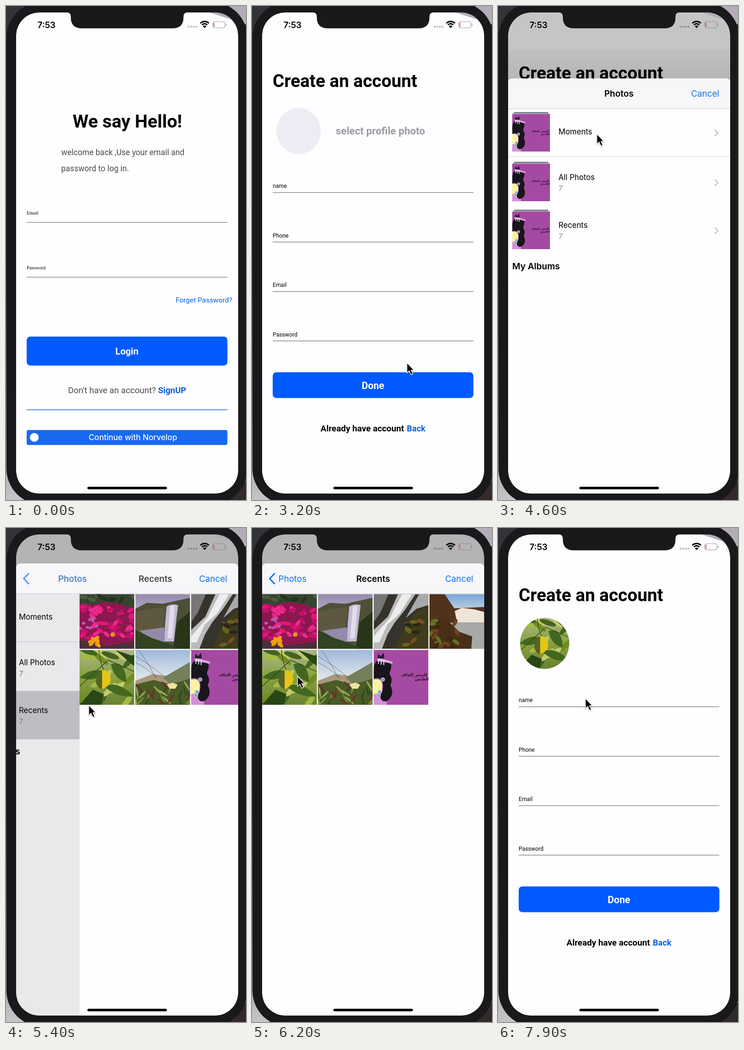
An HTML page that plays this animation: 522 by 1073 pixels, repeating every 8000 ms.

```html
<!DOCTYPE html>
<html lang="en">
<head>
<meta charset="utf-8">
<title>Sign-up flow</title>
<style>
html, body { margin: 0; width: 100%; height: 100%; overflow: hidden; background: #19181b; }
svg { display: block; width: 522px; height: 1073px; }
.r { font-family: Roboto, "Open Sans", sans-serif; }
.i { font-family: Inter, "Liberation Sans", sans-serif; }
.s { font-family: "Liberation Serif", serif; }
.b { font-weight: 700; }
.sb { font-weight: 600; }
.m { font-weight: 500; }
.mid { text-anchor: middle; }
.end { text-anchor: end; }
</style>
</head>
<body>
<svg id="stage" viewBox="0 0 522 1073" xmlns="http://www.w3.org/2000/svg"></svg>
<script>
const LOOP = 8000, SCREEN_W = 483, SHEET_TRAVEL = 990;
const BLUE = '#005aff', LINK = '#0a60e0', IOS = '#0a72ee';

const text = (x, y, size, cls, str, fill = '#000', extra = '') =>
  `<text x="${x}" y="${y}" font-size="${size}" class="${cls}" fill="${fill}" ${extra}>${str}</text>`;
const rect = (x, y, w, h, fill, extra = '') =>
  `<rect x="${x}" y="${y}" width="${w}" height="${h}" fill="${fill}" ${extra}/>`;
const path = (d, fill, extra = '') => `<path d="${d}" fill="${fill}" ${extra}/>`;
const stroke = (d, color, w) => path(d, 'none', `stroke="${color}" stroke-width="${w}" stroke-linecap="round" stroke-linejoin="round"`);
const rule = (y, color = '#67666b', h = 1.1) => rect(45, y - h / 2, 436.5, h, color);
const button = (y, h, r, fill) => rect(45, y, 436.5, h, fill, `rx="${r}"`);
const gradient = (id, ...stops) => `<linearGradient id="${id}" x2="0" y2="1">` +
  stops.map((c, i) => `<stop offset="${i / (stops.length - 1)}" stop-color="${c}"/>`).join('') + '</linearGradient>';

function randomFrom(seed) {
  return () => (seed = (seed * 16807) % 2147483647) / 2147483647;
}
function blobs(seed, n, [x, y, w, h], [rx, ry], colors) {
  const rnd = randomFrom(seed);
  return Array.from({ length: n }, (_, i) => {
    const cx = (x + rnd() * w).toFixed(1), cy = (y + rnd() * h).toFixed(1);
    return `<ellipse cx="${cx}" cy="${cy}" rx="${rx}" ry="${ry}" fill="${colors[i % colors.length]}"
      transform="rotate(${(rnd() * 120 - 60).toFixed(0)} ${cx} ${cy})"/>`;
  }).join('');
}

// Pictures are drawn on a 119 unit square.
const pictures = {
  flowers: rect(0, 0, 119, 119, '#8d174f') +
    path('M0 0H119V34L92 22L55 17L24 24L0 20Z', '#34452f') +
    blobs(71, 10, [0, 0, 119, 16], [9, 4], ['#4a5c42', '#263423']) +
    blobs(913, 54, [4, 26, 112, 78], [8, 4], ['#e3167b', '#c51069', '#ed2a8a']) +
    blobs(37, 8, [2, 50, 36, 28], [4, 3], ['#b35bb4']) +
    path('M0 119V100L26 104L60 112L119 103V119Z', '#4b3039') +
    blobs(19, 7, [25, 94, 17, 18], [7, 4], ['#f0a00d']) +
    '<circle cx="72" cy="88" r="5" fill="#e8941c"/>',
  gorge: rect(0, 0, 119, 119, 'url(#lilac)') +
    path('M0 32L25 19L60 21L119 8V119H0Z', '#4d5037') +
    path('M0 38L34 32L65 28L60 72L0 82Z', '#5f5841') +
    path('M68 27Q80 20 93 24L88 65L84 103H63L65 62Z', '#c4bbd6') +
    path('M76 26L86 25L80 96H70Z', '#e2dceb') +
    path('M8 80L64 72V106L40 98Z', '#928aa8') +
    path('M119 38L91 61L82 119H119Z', '#29351b') +
    path('M0 78L28 93L68 106L95 119H0Z', '#304421'),
  cascade: rect(0, 0, 119, 119, '#35332b') +
    path('M0 0H32L15 40L0 61Z', '#777575') +
    path('M53 0H91L69 33L45 63L30 88L18 119H0V78L31 49Z', '#b9bab9') +
    path('M62 0H83L56 43L30 66L12 105H0V92L35 52Z', '#ededed') +
    path('M99 0H119V24L93 32L70 52Z', '#a8aaaa') +
    path('M119 25L91 40L68 70L47 119H119Z', '#403b1c') +
    blobs(121, 12, [70, 55, 44, 60], [9, 4], ['#69621e', '#292619', '#755023']),
  lake: rect(0, 0, 119, 119, 'url(#morning)') +
    path('M0 0H33L54 31L119 28V71H0Z', '#51331d') +
    path('M55 37L70 30L97 33L119 39V62H60Z', '#efe4d8') +
    path('M43 62H119V119H30Z', '#a8a9a7') +
    path('M0 62L40 58L65 82L93 92L91 119H0Z', '#473016') +
    blobs(57, 17, [2, 58, 65, 57], [9, 4], ['#647022', '#6e421d', '#3b2916']),
  leaf: rect(0, 0, 119, 119, 'url(#foliage)') +
    blobs(433, 20, [0, 0, 119, 119], [20, 6], ['#718c23', '#a5b947', '#43641d', '#c3ca6a']) +
    path('M0 60Q26 37 54 47Q35 72 0 60ZM68 31Q99 20 102 69Q76 65 68 31ZM54 79Q83 65 119 101Q80 104 54 79Z', '#426820') +
    path('M0 119L29 86L53 96L47 119ZM78 0L119 14V35Z', '#294617') +
    stroke('M42 0Q44 28 54 46M0 79L62 22L119 47', '#35491c', 1.5) +
    path('M49 43Q66 43 68 63Q67 78 49 85Q44 66 49 43Z', '#e5c615') +
    path('M49 43Q38 52 35 68Q37 81 49 85Z', '#586322'),
  dune: rect(0, 0, 119, 119, 'url(#coast)') +
    path('M0 67L38 52L75 57L119 42V119H0Z', '#a8987f') +
    path('M60 60L119 26V76L77 75Z', '#74805a') +
    path('M0 75L40 65L77 75L119 62V119H0Z', '#4a5b26') +
    blobs(83, 28, [0, 73, 119, 44], [2, 12], ['#768d34', '#6b3028', '#324a1f', '#95a757']) +
    stroke('M0 13Q31 31 62 57M0 27Q24 38 48 61M7 0Q29 28 44 61', '#565a4e', .8) +
    path('M68 75L81 71L92 75L87 84L75 84Z', '#eee5a0'),
  poster: rect(0, 0, 119, 119, '#a54aa2') +
    path('M0 64Q17 60 19 76L18 91L0 98Z', '#faf3a3') +
    path('M0 96L15 92L28 105V119H0Z', '#d590d8') +
    path('M0 40Q3 18 18 23Q41 21 38 39L34 51Q43 65 36 76Q47 97 30 110Q17 116 13 99Q22 91 20 74Q18 57 0 62Z', '#18151c') +
    path('M8 18L10 8L15 14L22 6L23 18Z', '#211c29') +
    path('M9 18L30 22L42 26L40 30L27 27L7 24Z', '#d9a8df') +
    stroke('M12 19L10 29M17 20L16 31M22 21L22 32', '#eee5f2', 2) +
    [[20, 64], [13, 91], [11, 99]].map(([x, y]) =>
      `<circle cx="${x}" cy="${y}" r="4" fill="#8aa0b7" stroke="#d6e0e8"/>`).join('') +
    `<g font-family="'DejaVu Sans', sans-serif" font-weight="700" font-size="9" fill="#301530" text-anchor="middle">
      <text x="88" y="57">للشعر الجاف</text><text x="105" y="66">العايش</text></g>`
};
const picture = (name, x, y, size) =>
  `<svg x="${x}" y="${y}" width="${size}" height="${size}" viewBox="0 0 119 119">${pictures[name]}</svg>`;

const login = rect(22, 14, SCREEN_W, 1045, '#fefdff') +
  text(264, 264, 39.3, 'r b mid', 'We say Hello!') +
  text(120, 324, 17.5, 'r', 'welcome back ,Use your email and', '#4b4b50') +
  text(120, 359, 17.5, 'r', 'password to log in.', '#4b4b50') +
  text(45, 452.5, 10.7, 's', 'Email') + rule(470) +
  text(45, 571.5, 10.7, 's', 'Password') + rule(589) +
  text(492, 644, 15.4, 'r end', 'Forget Password?', LINK) +
  button(718, 63, 8, BLUE) + text(263, 757, 20.2, 'r b mid', 'Login', '#fff') +
  text(135, 841, 18.7, 'r', "Don't have an account?", '#4b4b50') +
  text(392, 841, 18.5, 'r b end', 'SignUP', LINK) +
  rule(877, '#235fc5', 1.4) +
  button(921, 32.5, 4, '#1769f0') + '<circle cx="61.5" cy="937" r="9.5" fill="#fff"/>' +
  text(276, 943, 17.1, 'i m mid', 'Continue with Norvelop', '#fff');

const account = rect(22, 14, SCREEN_W, 1045, '#fefdff') + '<g id="form">' +
  text(45, 159, 38.5, 'r b', 'Create an account') +
  '<g id="emptyPhoto"><ellipse cx="101.3" cy="254.5" rx="48" ry="49.7" fill="#ecedf4"/>' +
  text(182, 262, 22.4, 'r b', 'select profile photo', '#9b9ba1', 'id="selectPhoto"') + '</g>' +
  `<g id="avatar" clip-path="url(#avatarClip)">${picture('leaf', 46, 195, 111)}</g>` +
  ['name', 'Phone', 'Email', 'Password'].map((label, i) => {
    const y = 388.3 + i * 107.4;
    return text(45, y - 10, 12.2, 'r', label) + rule(y);
  }).join('') +
  button(778.5, 56, 8, BLUE) + text(263, 815, 21.2, 'r b mid', 'Done', '#fff') +
  text(149, 907, 18.8, 'r b', 'Already have account') +
  text(377, 907, 18, 'r b end', 'Back', LINK) + '</g>';

// Sheet parts use y = 0 at the top edge of the sheet.
const albumRow = (y, label, count) =>
  rect(35, y - 3.5, 74, 1.5, '#343841') + rect(33, y - 1.5, 78, 1.5, '#8291a0') +
  picture('poster', 31, y, 82) +
  text(131.5, y + (count ? 36 : 45), 16.7, 'i', label) +
  (count ? text(131.5, y + 60, 16.5, 'i', count, '#8a8a8f') : '') +
  stroke(`M472 ${y + 35}l6 6.5l-6 6.5`, '#b9b9be', 2);

const albums = rect(22, 0, SCREEN_W, 1000, '#fefdff') +
  rect(22, 277, SCREEN_W, 105, '#cfced4', 'id="rowPress"') +
  albumRow(77, 'Moments') + rect(22, 169.5, SCREEN_W, 1, '#d5d4d9') +
  albumRow(185, 'All Photos', '7') + albumRow(289, 'Recents', '7') +
  text(31, 415, 19, 'i sb', 'My Albums');

const grid = rect(22, 0, SCREEN_W, 1000, '#fefdff') +
  ['flowers', 'gorge', 'cascade', 'lake', 'leaf', 'dune', 'poster'].map((name, i) =>
    picture(name, 22 + (i % 4) * 121.3, i < 4 ? 66.5 : 188, 119)).join('');

const sheet = '<g clip-path="url(#sheetClip)">' +
  `<g id="albums">${albums}</g>` + rect(22, 0, SCREEN_W, 1000, '#000', 'id="albumShade"') +
  `<g id="grid">${grid}</g>` +
  rect(22, 0, SCREEN_W, 66, '#f7f6f9') + rect(22, 65.3, SCREEN_W, 1, '#c9c8cd') +
  `<g id="backArrow">${stroke('M49 22L38.5 33L49 44', IOS, 3)}</g>` +
  text(0, 40, 18.9, 'i sb mid', 'Photos', '#000', 'id="oldTitle"') +
  text(0, 40, 18.6, 'i mid', 'Photos', IOS, 'id="backLabel"') +
  text(0, 40, 18.8, 'i sb mid', 'Recents', '#000', 'id="newTitle"') +
  text(481, 40, 18.6, 'i end', 'Cancel', IOS) + '</g>';

const statusBar = text(88, 47.5, 18.6, 'i sb mid', '7:53') +
  [397, 402.7, 408.4, 414].map(x => `<circle cx="${x}" cy="45" r="2.2" fill="#000" opacity=".24"/>`).join('') +
  [[9.5, 37.5], [6, 41]].map(([w, y]) =>
    path(`M${432 - w} ${y}Q432 ${y - w * .85} ${432 + w} ${y}`, 'none', 'stroke="#000" stroke-width="2.8"')).join('') +
  path('M432 48L428 43.8Q432 41 436 43.8Z', '#000') +
  rect(449.5, 34, 27, 13.5, 'none', 'rx="4" stroke="#77757b" stroke-opacity=".7" stroke-width="1.2"') +
  rect(451.3, 36, 1.8, 9.5, '#d8503c', 'rx=".8"') + path('M478.3 38.5Q481 40.8 478.3 43Z', '#77757b');

const bezel = path('M0 0H522V1073H0ZM22 64V1009A50 50 0 0 0 72 1059H455A50 50 0 0 0 505 1009V64A50 50 0 0 0 455 14H72A50 50 0 0 0 22 64Z',
    'url(#desk)', 'fill-rule="evenodd"') +
  path('M400 0H522V40Z', '#b4adb8') + path('M480 1073H522V1030Z', '#332a2c') +
  path('M79-9H447A78 78 0 0 1 525 69V1005A78 78 0 0 1 447 1083H79A78 78 0 0 1 1 1005V69A78 78 0 0 1 79-9Z' +
    'M22 64V1009A50 50 0 0 0 72 1059H455A50 50 0 0 0 505 1009V64A50 50 0 0 0 455 14H72A50 50 0 0 0 22 64Z',
    '#19181b', 'fill-rule="evenodd"') +
  path('M132 13V14Q141 14 141 23V25Q141 48.5 165 48.5H362Q386 48.5 386 25V23Q386 14 395 14V13Z', '#19181b');

document.getElementById('stage').innerHTML = `<defs>
  ${gradient('lilac', '#9389ad', '#c8bfd4', '#81778f')}
  ${gradient('morning', '#78a5d8', '#f5eee7', '#a8a29b')}
  ${gradient('foliage', '#aab58a', '#88a23d', '#668232')}
  ${gradient('coast', '#9fb8dc', '#dfe5eb', '#b4a38c')}
  ${gradient('desk', '#333438', '#28292d', '#24252a', '#747478', '#c5c5c7')}
  ${gradient('shade', '#00000008', '#0000001c')}
  <clipPath id="screenClip"><rect x="22" y="14" width="483" height="1045" rx="50"/></clipPath>
  <clipPath id="sheetClip"><path d="M22 1000V10Q22 0 32 0H495Q505 0 505 10V1000Z"/></clipPath>
  <clipPath id="avatarClip"><ellipse cx="101.5" cy="250.5" rx="53.5" ry="55.5"/></clipPath>
</defs>
<g clip-path="url(#screenClip)">
  <g id="login">${login}</g><g id="account">${account}</g>
  <g id="dim">${rect(22, 14, SCREEN_W, 1045, '#000', 'opacity=".29"')}${rect(22, 95, SCREEN_W, 64, 'url(#shade)')}</g>
  <g id="sheet">${sheet}</g>
  ${statusBar}${rect(177, 1044.2, 173, 5.6, '#000', 'rx="2.8"')}
</g>
${bezel}
<g id="cursor" style="filter:drop-shadow(0 1px 1px #0006)">${path('M0 0V22L5 17.5L9 26L13 24.3L9.2 16H15.5Z', '#000', 'stroke="#fff" stroke-width="1.4"')}</g>`;

const el = {};
document.querySelectorAll('#stage g[id], #stage rect[id], #stage text[id]').forEach(n => el[n.id] = n);
const move = (node, x, y = 0) => node.setAttribute('transform', `translate(${x.toFixed(2)} ${y.toFixed(2)})`);
const fade = (node, a) => node.setAttribute('opacity', a.toFixed(3));

const clamp = v => Math.max(0, Math.min(1, v));
const smooth = (t, a, b) => { const u = clamp((t - a) / (b - a)); return u * u * (3 - 2 * u); };
// Critically damped spring: the share of the way still to go.
const remaining = (t, start) => { const u = Math.max(0, t - start) * .012; return (1 + u) * Math.exp(-u); };

const cursorStops = [
  [900, 540, 980], [1500, 354, 838], [2300, 354, 838], [3200, 337, 775], [3900, 215, 269], [4250, 215, 269],
  [4600, 215, 278], [5000, 180, 385], [5400, 180, 385], [6100, 99, 322], [7000, 99, 322], [7700, 190, 370]
];
function cursorAt(t) {
  const i = cursorStops.findIndex(s => s[0] > t);
  if (i === 0) return cursorStops[0].slice(1);
  if (i < 0) return cursorStops.at(-1).slice(1);
  const [t0, x0, y0] = cursorStops[i - 1], [t1, x1, y1] = cursorStops[i];
  const k = smooth(t, t0, t1);
  return [x0 + (x1 - x0) * k, y0 + (y1 - y0) * k];
}

function render(t) {
  const page = remaining(t, 2050);
  move(el.login, -145 * (1 - page));
  move(el.account, SCREEN_W * page);
  move(el.form, 0, 17 * (1 - smooth(t, 3300, 3600)));

  const chosen = t >= 6900;
  fade(el.emptyPhoto, chosen ? 0 : 1);
  fade(el.avatar, chosen ? 1 : 0);
  fade(el.selectPhoto, t >= 4100 && t < 4400 ? .35 : 1);

  const down = t < 7000 ? remaining(t, 4255) : 1 - remaining(t, 7000);
  move(el.sheet, 0, 77 + SHEET_TRAVEL * down);
  fade(el.dim, (1 - down) ** 3);

  const push = remaining(t, 5192), label = 88 + 175 * push ** .9;
  move(el.albums, -145 * (1 - push));
  move(el.grid, SCREEN_W * push);
  fade(el.albumShade, .115 * (1 - push));
  fade(el.rowPress, t >= 5100 ? 1 : 0);
  move(el.oldTitle, label);
  move(el.backLabel, label);
  move(el.newTitle, 263.5 + 215 * push);
  fade(el.oldTitle, push);
  fade(el.backLabel, 1 - push);
  fade(el.backArrow, 1 - push);
  fade(el.newTitle, 1 - push);

  move(el.cursor, ...cursorAt(t));
}

function tick() {
  render(performance.now() % LOOP);
  requestAnimationFrame(tick);
}
tick();
</script>
</body>
</html>
```
